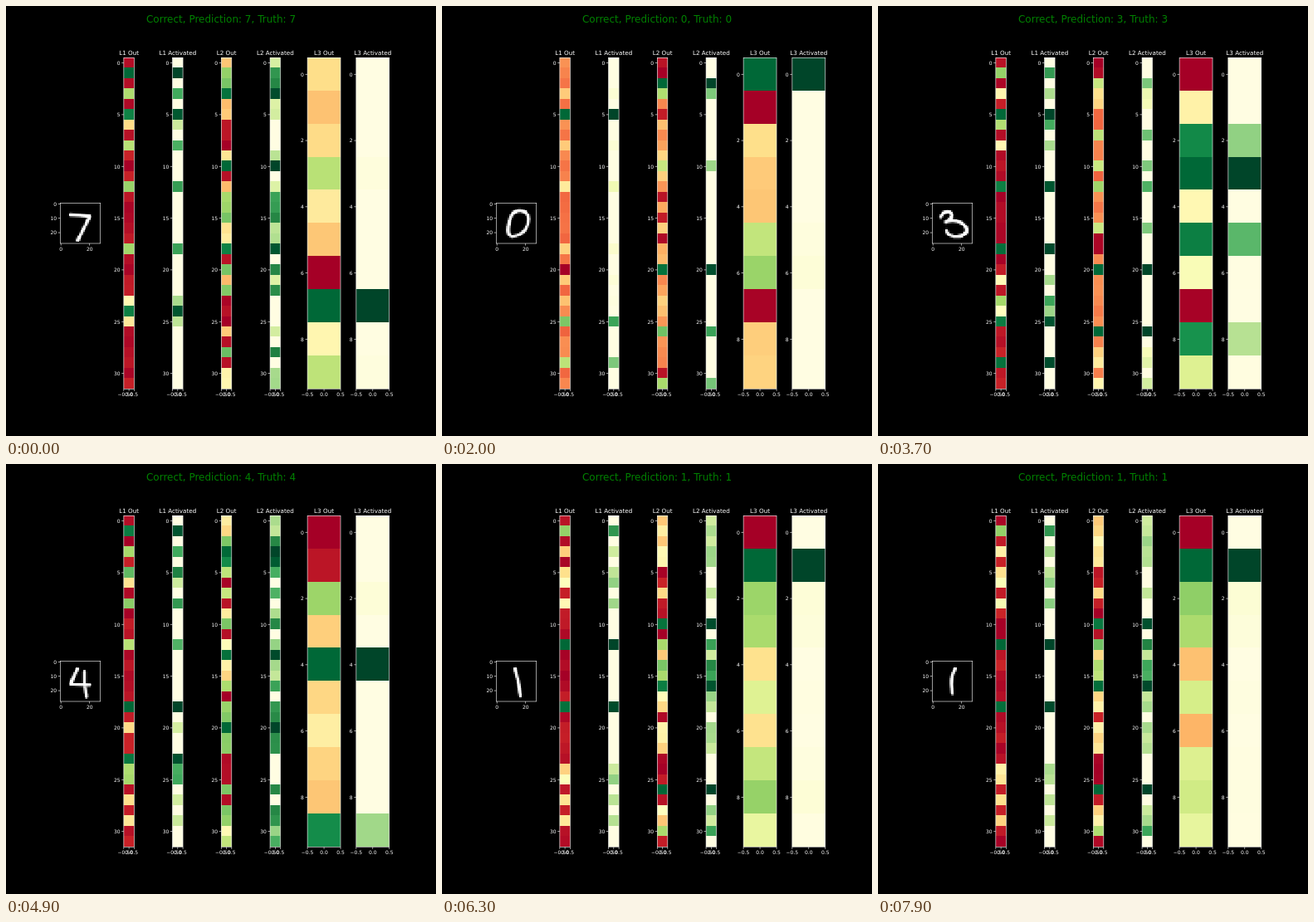
These frames come from a looping animation (518x518 px, 8 s). An HTML page with a canvas:

```html
<!DOCTYPE html>
<html lang="en">
<head>
<meta charset="utf-8">
<title>Layer activations</title>
<style>
  html, body { margin: 0; height: 100%; overflow: hidden; background: #000; }
  canvas { display: block; }
</style>
</head>
<body>
<canvas id="stage" width="518" height="518"></canvas>
<script>
const ctx = document.getElementById('stage').getContext('2d');
const ink = document.createElement('canvas');
ink.width = ink.height = 28;
const pen = ink.getContext('2d');

const STEP = 100, TOP = 62.3, HEIGHT = 399, FONT = '"DejaVu Sans", sans-serif';
const DIGITS = '72104195490690159734' + '06654074013134727312' +
               '11742351244635560419' + '57819374643070291731';
const RD_YL_GN = ['a50026', 'd73027', 'f46d43', 'fdae61', 'fee08b', 'ffffbf',
                  'd9ef8b', 'a6d96a', '66bd63', '1a9850', '006837'];
const YL_GN = ['fffde2', 'f7fcb9', 'd9f0a3', 'addd8e', '78c679',
               '41ab5d', '238443', '006837', '004529'];

// Pen strokes on a 28 x 28 grid; some digits are written in two ways
const STROKES = [
  ['M16 5Q22 5 22.5 11Q22 17 19 20Q15 23.5 10.5 23Q7.5 22 8.5 16Q10 5 16 5Z'],
  ['M16 5Q13 10 13.4 16L14 22.5', 'M13 5L15 13L17 24'],
  ['M8 9Q11 4 17 6Q20 9 16 14Q12 19 8 22Q14 20 21 22'],
  ['M6 9.5Q8 5 12 6Q15 8 12.5 11L9.5 13Q14 11 19 13Q25 16 24 20Q21 24 15 23Q10 22 10 19'],
  ['M11.5 6Q8 13 8 16.5Q13 18.5 19 15M20 6Q19.5 14 17.5 24.5',
   'M12 5.3L8 14L7.3 15.8L20.5 16.3M17 7.2L17 16L18.3 24.5'],
  ['M20 6L12 6L10 13Q18 12 18 18Q16 24 8 22'],
  ['M17 4Q9 10 9 18Q11 24 17 21Q20 15 15 14Q11 15 9 19'],
  ['M7 8L13 8.3L20.5 9.2L17.5 15.5L12.2 25.8'],
  ['M18 7Q12 3 10 8Q11 12 17 17Q18 23 13 23Q9 21 13 15Q20 9 18 7'],
  ['M19 8Q13 4 9 10Q9 15 14 14Q18 13 19 8Q18 16 15 24']
];

// Each layer sits at its rest level, apart from the units a digit excites or silences
const LEVELS = { peak: 0.93, firm: 0.69, faint: 0.43, low: 0.06 };
const QUIET = [6, 8, 11, 23, 24, 25, 27];
const RESPONSE = {
  0: [
    { rest: 0.26, zero: 0.33, peak: [5], firm: [25, 29], faint: [3, 8, 12, 18, 21, 23], low: [20] },
    { rest: 0.32, zero: 0.38, peak: [2, 20], firm: [3, 10, 26, 31], low: [0, 1, 5, 13, 15, 17, 30] },
    { rest: 0.4, firm: [5, 6], low: [1, 7] }
  ],
  1: [
    { rest: 0.05, zero: 0.12, peak: [12, 18], firm: [1], faint: [3, 5, 6, 8, 24, 25, 27, 29] },
    { rest: 0.42, zero: 0.11, peak: [10, 16, 26], firm: [12, 14, 15, 30], low: [5, 9, 19, 31, ...QUIET] },
    { rest: 0.62, firm: [2, 3, 7, 8], faint: [4, 6], low: [0] }
  ],
  3: [
    { rest: 0.04, zero: 0.15, peak: [5, 12, 18, 25, 29], firm: [1, 6, 23], faint: [3, 8, 21, 24] },
    { rest: 0.27, zero: 0.28, peak: [20, 26], firm: [2, 7, 10, 12, 16], faint: [3, 4, 28, 29, 31], low: [0, 1, 17, 18] },
    { rest: 0.54, peak: [2, 5, 8], low: [0, 7] }
  ],
  4: [
    { rest: 0.05, zero: 0.18, peak: [1, 18, 23], firm: [3, 5, 8, 12, 24, 25], faint: [6, 20, 27, 29] },
    { rest: 0.45, zero: 0.1, peak: [3, 4, 13, 20], firm: [2, 5, 7, 10, 16, 18, 19, 21, 22, 26, 28, 29, 31], low: [17, ...QUIET] },
    { rest: 0.42, peak: [9], firm: [2], low: [0, 1] }
  ],
  7: [
    { rest: 0.05, zero: 0.15, peak: [1, 5, 24], firm: [3, 8, 12, 18], faint: [6, 23, 25] },
    { rest: 0.4, zero: 0.12, peak: [3, 10, 18], firm: [1, 2, 13, 14, 15, 20, 22, 28], low: [7, 19, 29, ...QUIET] },
    { rest: 0.46, firm: [3, 9], low: [6] }
  ]
};
// The digit whose response each digit resembles
const KIN = [0, 1, 3, 3, 4, 3, 0, 7, 3, 4];

function random(seed) {
  const x = Math.sin(seed * 12.9898 + 4.1) * 43758.5453;
  return x - Math.floor(x);
}

function respond(layer, size, seed) {
  return Array.from({ length: size }, (_, i) => {
    const name = Object.keys(LEVELS).find(k => layer[k]?.includes(i));
    const level = name ? LEVELS[name] : layer.rest;
    const swing = level < 0.3 || level > 0.9 ? 0.07 : 0.14;
    return level + (random(seed + i * 7) - 0.5) * swing;
  });
}

function rescale(list) {
  const min = Math.min(...list), max = Math.max(...list);
  return list.map(v => (v - min) / (max - min));
}

function mapColour(stops, t) {
  const p = t * (stops.length - 1);
  const i = Math.min(Math.floor(p), stops.length - 2);
  const channel = (hex, c) => parseInt(hex.slice(c * 2, c * 2 + 2), 16);
  const mix = c => {
    const a = channel(stops[i], c), b = channel(stops[i + 1], c);
    return Math.round(a + (b - a) * (p - i));
  };
  return `rgb(${mix(0)},${mix(1)},${mix(2)})`;
}

function label(text, x, y, size, align = 'center', colour = '#fff') {
  ctx.font = `${size}px ${FONT}`;
  ctx.textAlign = align;
  ctx.fillStyle = colour;
  ctx.fillText(text, x, y);
}

function tickLeft(text, x, y) {
  ctx.fillStyle = '#fff';
  ctx.fillRect(x - 2.6, y - 0.3, 2.6, 0.6);
  label(text, x - 4.2, y + 2.3, 6, 'right');
}

function tickBelow(text, x, y) {
  ctx.fillStyle = '#fff';
  ctx.fillRect(x - 0.3, y, 0.6, 2.6);
  label(text, x, y + 8.8, 6);
}

function frame(x, y, w, h) {
  ctx.strokeStyle = '#fff';
  ctx.lineWidth = 0.6;
  ctx.strokeRect(x, y, w, h);
}

function drawColumn(title, index, values, stops) {
  const centre = 148.1 + index * 58.74;
  const n = values.length, row = HEIGHT / n, width = Math.min(row, 39.9);
  const x = centre - width / 2;
  const edge = i => Math.floor(TOP + i * row);
  values.forEach((v, i) => {
    ctx.fillStyle = mapColour(stops, v);
    ctx.fillRect(x, edge(i), width, edge(i + 1) - edge(i));
  });
  frame(x, TOP, width, HEIGHT);
  for (let i = 0; i < n; i += n > 10 ? 5 : 2) tickLeft(i, x, TOP + (i + 0.5) * row);
  ['−0.5', '0.0', '0.5'].forEach((t, i) => tickBelow(t, x + width * i / 2, TOP + HEIGHT));
  label(title, centre, 58.7, 7.2);
}

function drawDigit(digit, step) {
  const x = 65.3, y = 237.6, size = 48.4, cell = size / 28;
  const forms = STROKES[digit];
  pen.fillStyle = '#000';
  pen.fillRect(0, 0, 28, 28);
  pen.strokeStyle = '#fff';
  pen.lineWidth = 2.3;
  pen.lineCap = pen.lineJoin = 'round';
  pen.stroke(new Path2D(forms[(step >> 4) % forms.length]));
  ctx.imageSmoothingEnabled = false;
  ctx.drawImage(ink, x, y, size, size);
  frame(x, y, size, size);
  [0, 10, 20].forEach(v => tickLeft(v, x, y + (v + 0.5) * cell));
  [0, 20].forEach(v => tickBelow(v, x + (v + 0.5) * cell, y + size));
}

function draw(step) {
  const digit = +DIGITS[step];
  const layers = RESPONSE[KIN[digit]];

  ctx.fillStyle = '#000';
  ctx.fillRect(0, 0, 518, 518);
  label(`Correct, Prediction: ${digit}, Truth: ${digit}`, 259, 20, 12, 'center', '#008000');
  drawDigit(digit, step);

  layers.forEach((layer, k) => {
    const last = k === 2;
    const raw = respond(layer, last ? 10 : 32, step * 97 + k * 1000);
    if (last) raw[digit] = 1;
    const out = rescale(raw);
    const active = last
      ? out.map(v => Math.exp((v - 1) * 12))
      : out.map(v => Math.max(0, v - layer.zero) / (1 - layer.zero));
    drawColumn(`L${k + 1} Out`, k * 2, out, RD_YL_GN);
    drawColumn(`L${k + 1} Activated`, k * 2 + 1, active, YL_GN);
  });
}

const start = performance.now();
let shown = -1;
function tick() {
  const step = Math.floor((performance.now() - start) / STEP) % DIGITS.length;
  if (step !== shown) draw(shown = step);
  requestAnimationFrame(tick);
}
tick();
</script>
</body>
</html>
```
